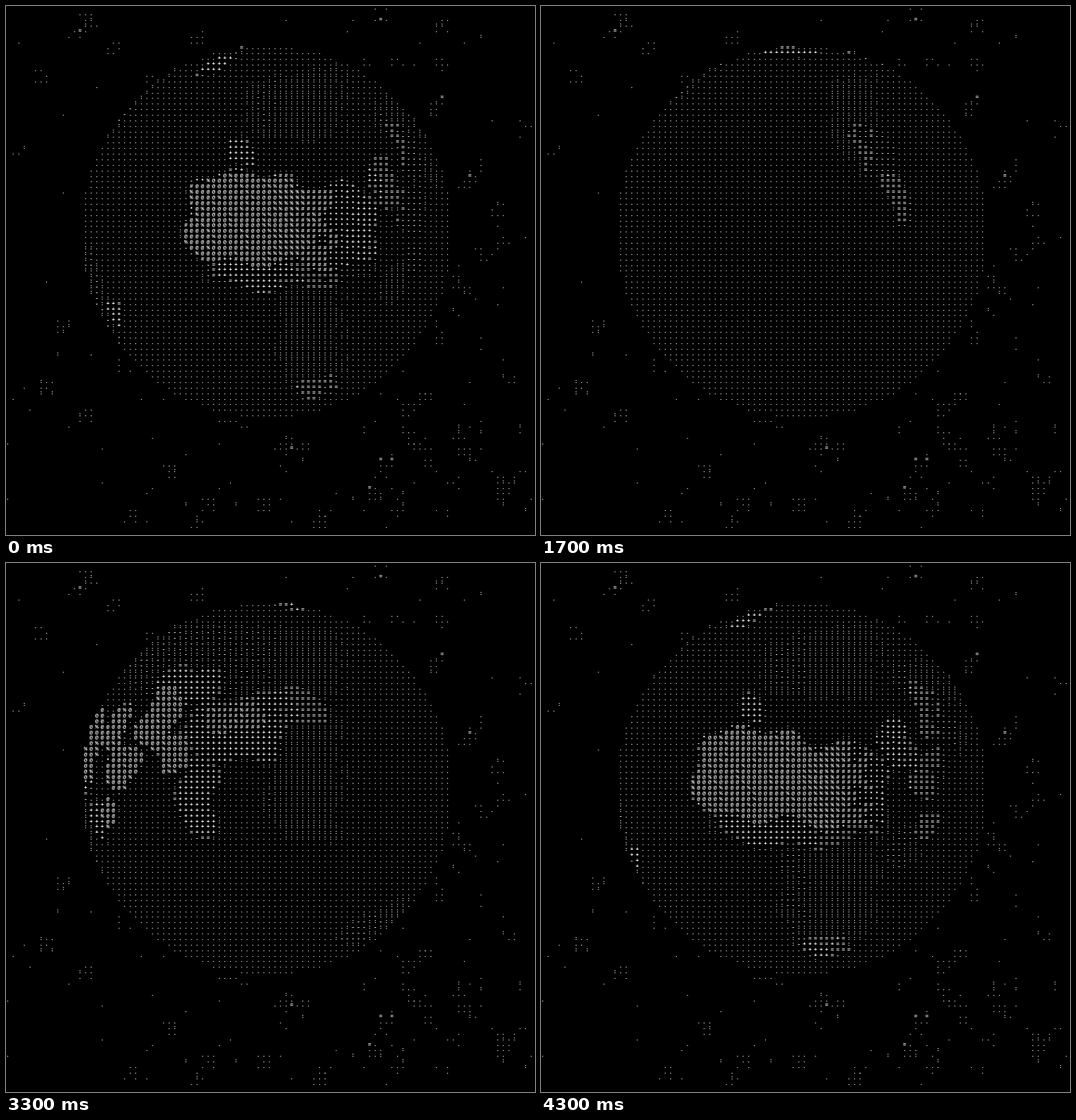
Recreate the animation shown at these times as an HTML page with a canvas. Size 748 by 748 pixels, loop 4.4 s.

```html
<!DOCTYPE html>
<html lang="en">
<head>
<meta charset="utf-8">
<title>Character globe</title>
<style>
  html, body { margin: 0; width: 100%; height: 100%; overflow: hidden; background: #000; }
  canvas { display: block; }
</style>
</head>
<body>
<canvas id="stage" width="748" height="748"></canvas>
<script>
const ctx = document.getElementById('stage').getContext('2d');
const SIZE = 748, GRID = 95, PITCH = SIZE / GRID, RAMP = ' .:-=+*#%@';
const FRAMES = 44, FRAME_MS = 100;
const RADIUS = 33.4, CENTER_X = 46.5, CENTER_Y = 40;
const DISTANCE = 4, SPAN = DISTANCE ** 2 - 1;
const DEG = 180 / Math.PI, TILT = 21 / DEG, START_LON = 5;

const clamp = value => Math.max(0, Math.min(1, value));
const wrap = lon => ((lon + 540) % 360 + 360) % 360 - 180;

// A rounded patch of land in degrees; a larger sharpness gives a harder rim
function patch(level, sharpness, lon, lat, rx, ry) {
  return (x, y) => {
    const dx = Math.abs(wrap(x - lon)) / rx, dy = Math.abs(y - lat) / ry;
    const d = Math.cbrt(dx ** 3 + dy ** 3);
    return level * clamp((1.08 - d) * sharpness);
  };
}
const desert = (...shape) => patch(9.5, 8, ...shape);
const highland = (...shape) => patch(7.6, 4, ...shape);
const dry = (...shape) => patch(5.6, 3.5, ...shape);
const green = (...shape) => patch(2.95, 5, ...shape);

const africa = [
  desert(0, 24, 17, 11), desert(23, 21, 13, 10.5), desert(47, 8, 4, 4),
  dry(12, 11, 25, 5), dry(41, 3, 6, 6), dry(21, -27, 8, 7), green(22, -8, 15, 22)
];
const eurasia = [
  desert(42, 29, 6, 7), desert(50, 21, 7, 6), desert(59, 36, 7, 9), desert(68, 28, 5, 5),
  highland(84, 38, 11, 4), dry(85, 35, 18, 9), dry(77, 18, 6, 11), dry(65, 46, 17, 6),
  dry(103, 41, 13, 6), dry(-4, 40, 5, 4), green(75, 55, 85, 15), green(108, 25, 14, 20)
];
const americas = [
  highland(-106, 28, 4, 8), dry(-110, 40, 8, 9), dry(-70, -22, 3, 14), dry(-42, -9, 4, 5),
  green(-95, 48, 30, 18), green(-60, -12, 16, 20)
];
const others = [dry(133, -25, 17, 9), dry(-42, 72, 14, 8), dry(-165, 82, 75, 5)];
const land = [...africa, ...eurasia, ...americas, ...others];

function brightness(lon, lat) {
  // Gentle waves roughen the coasts and mottle the surface
  const x = lon + 1.4 * Math.sin(lat * 0.45), y = lat + Math.sin(lon * 0.4);
  const grain = 1 + 0.06 * Math.sin(lon * 0.7 + 2 * Math.sin(lat * 0.6));
  return grain * Math.max(1.2, ...land.map(levelAt => levelAt(x, y)));
}

function drawGlyph(glyph, col, row) {
  ctx.fillText(glyph, col * PITCH, row * PITCH + 5.4);
}

let seed = 71;
function random() {
  seed = (seed * 16807) % 2147483647;
  return seed / 2147483647;
}
const randomCell = () => Math.floor(random() * GRID);

// Loose clusters and single stars, denser towards the lower right
function makeStars() {
  const stars = [];
  while (stars.length < 380) {
    const col = randomCell(), row = randomCell();
    if (random() > 0.35 + 0.65 * (col * row) / GRID ** 2) continue;
    const reach = random() < 0.4 ? 1 : 0;
    for (let y = row - reach; y <= row + reach; y++) {
      for (let x = col - reach; x <= col + reach; x++) {
        const outside = Math.hypot(x - CENTER_X, y - CENTER_Y) > RADIUS + 1;
        if (!outside || (reach && random() < 0.4)) continue;
        const roll = random();
        stars.push([roll < 0.01 ? '=' : roll < 0.13 ? ':' : '.', x, y]);
      }
    }
  }
  return stars;
}
const stars = makeStars();

function drawGlobe(frame) {
  const viewLon = START_LON - frame * 360 / FRAMES;
  for (let row = 0; row < GRID; row++) {
    for (let col = 0; col < GRID; col++) {
      const px = (col - CENTER_X) / RADIUS, py = (CENTER_Y - row) / RADIUS;
      const r2 = px * px + py * py;
      if (r2 > 1) continue;
      // Meet the perspective ray with the unit sphere
      const reach = (DISTANCE - Math.sqrt(1 - r2)) / (1 + r2 / SPAN);
      const x = px * reach / Math.sqrt(SPAN), y = py * reach / Math.sqrt(SPAN);
      const z = DISTANCE - reach;
      const up = y * Math.cos(TILT) + z * Math.sin(TILT);
      const depth = z * Math.cos(TILT) - y * Math.sin(TILT);
      const lon = viewLon + Math.atan2(x, depth) * DEG;
      const lat = Math.asin(Math.max(-1, Math.min(1, up))) * DEG;
      const light = 1 - 0.8 * Math.max(0, px);
      const level = Math.floor(brightness(lon, lat) * light);
      drawGlyph(RAMP[Math.max(1, Math.min(9, level))], col, row);
    }
  }
}

let shown = -1;
function render() {
  const frame = Math.floor(performance.now() / FRAME_MS) % FRAMES;
  if (frame !== shown) {
    shown = frame;
    ctx.fillStyle = '#000';
    ctx.fillRect(0, 0, SIZE, SIZE);
    ctx.fillStyle = '#fff';
    ctx.font = 'bold 8px "Liberation Mono", monospace';
    for (const star of stars) drawGlyph(...star);
    drawGlobe(frame);
  }
  requestAnimationFrame(render);
}
render();
</script>
</body>
</html>
```
